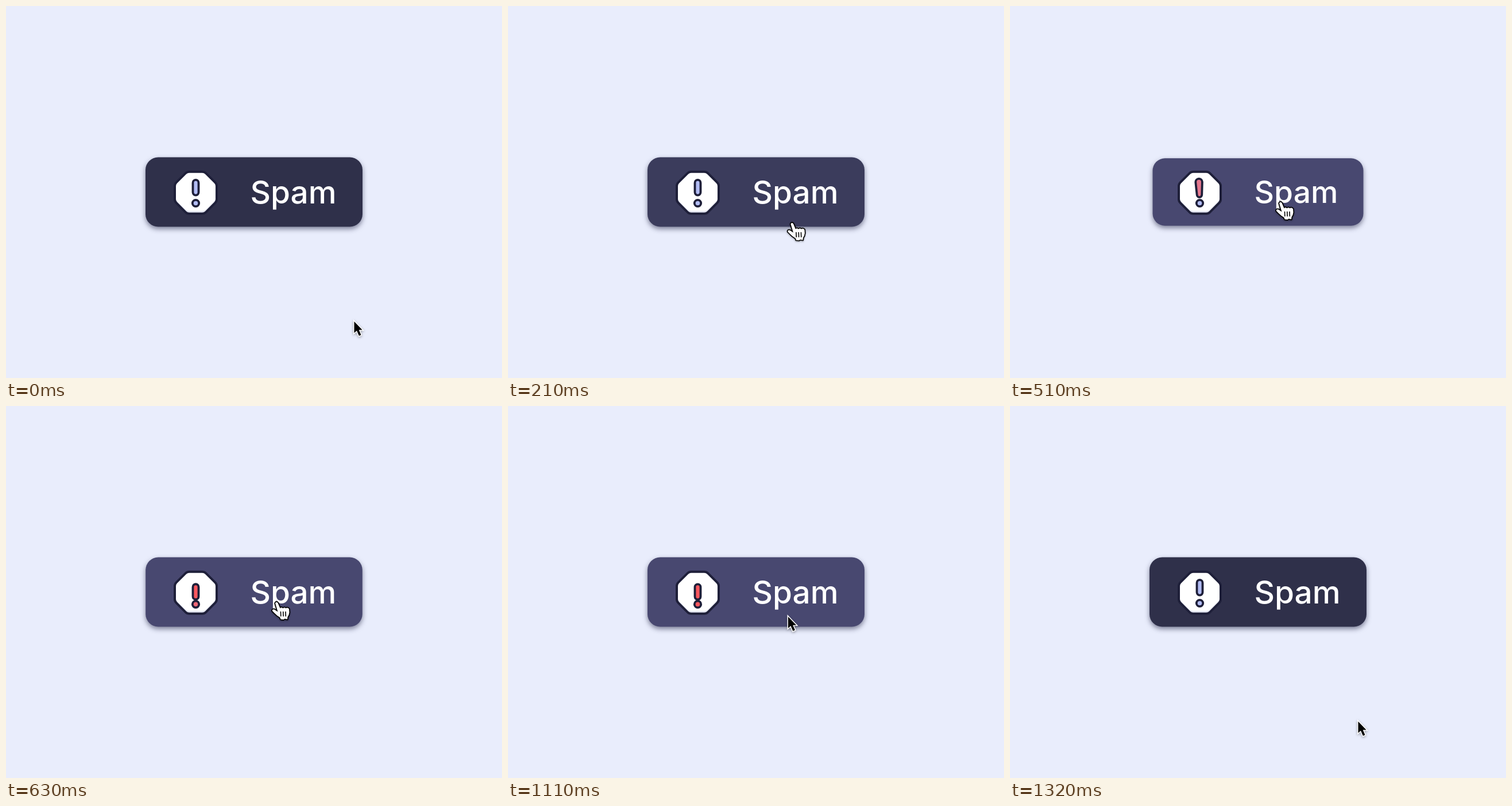
An HTML page with a canvas that plays this animation: 864x648 px, repeating every 1800 ms.

```html
<!DOCTYPE html>
<html lang="en">
<head>
<meta charset="utf-8">
<title>Spam button</title>
<style>
  html, body { margin: 0; width: 100%; height: 100%; overflow: hidden; background: #e9edfc; }
  canvas { display: block; }
</style>
</head>
<body>
<canvas id="stage" width="864" height="648"></canvas>
<script>
const ctx = document.getElementById('stage').getContext('2d');
const LOOP = 1800, STEP = 30;
const DARK = [47, 48, 74], HOVER = [72, 72, 112];
const BLUE = [178, 188, 244], RED = [251, 87, 94];
const INK = '#1e1f39';
const ICON = { x: 330.5, y: 325.2 };
const HAND = new Path2D('M-2.5 2Q-.5 -1.8 2 1.5L6 11Q8 8 11 11Q13.5 8.5 16 11Q19 8.8 21.5 12L22 18Q21.5 23 19 26L18.5 30L14 29L12 30.5L7 30L6 27Q0 23.5 -3 20L-7.5 15.5Q-8 12 -4 13L2 17Z');
const ARROW = new Path2D('M0 0V20L4.5 16L8.4 25L12 23.4L8.2 14.8H14.2Z');

const lerp = (a, b, k) => a + (b - a) * k;
const mix = (a, b, k) => `rgb(${a.map((v, i) => Math.round(lerp(v, b[i], k))).join()})`;
const clamp = v => Math.min(1, Math.max(0, v));

// The standard CSS "ease" curve, solved by bisection.
function ease(x) {
  const bez = (p, q, s) => 3 * p * s * (1 - s) ** 2 + 3 * q * s * s * (1 - s) + s ** 3;
  if (x <= 0 || x >= 1) return clamp(x);
  let lo = 0, hi = 1;
  for (let i = 0; i < 24; i++) {
    const mid = (lo + hi) / 2;
    if (bez(0.25, 0.25, mid) < x) lo = mid; else hi = mid;
  }
  return bez(0.1, 1, lo);
}
const ramp = (t, from, to) => ease((t - from) / (to - from));
const pulse = (t, a, b, c, d) => ramp(t, a, b) - ramp(t, c, d);

function withShadow(color, blur, dy, draw) {
  ctx.save();
  ctx.shadowColor = color;
  ctx.shadowBlur = blur;
  ctx.shadowOffsetY = dy;
  draw();
  ctx.restore();
}

function drawButton(t) {
  const scale = 1 - 0.029 * pulse(t, 420, 510, 540, 660);
  ctx.save();
  ctx.translate(432, 324);
  ctx.scale(scale, scale);
  ctx.fillStyle = mix(DARK, HOVER, pulse(t, 180, 285, 1110, 1250));
  withShadow('rgba(47,48,80,.58)', 8, 4, () => {
    ctx.beginPath();
    ctx.roundRect(-189, -60.5, 378, 121, 22);
    ctx.fill();
  });
  ctx.fillStyle = '#fff';
  ctx.font = '500 55px Inter, sans-serif';
  ctx.fillText('Spam', -6.6, 19.6);
  ctx.restore();
}

function octagon(half, radius) {
  const path = new Path2D();
  const corner = i => {
    const a = (i + 0.5) * Math.PI / 4, r = half / Math.cos(Math.PI / 8);
    return [r * Math.cos(a), r * Math.sin(a)];
  };
  path.moveTo(half, 0);
  for (let i = 0; i < 8; i++) path.arcTo(...corner(i), ...corner(i + 1), radius);
  path.closePath();
  return path;
}
const SIGN = octagon(36.5, 9);

function drawSign() {
  ctx.save();
  ctx.translate(ICON.x, ICON.y);
  ctx.fillStyle = '#dfe2ee';
  ctx.fill(SIGN);
  ctx.save();
  ctx.clip(SIGN);
  ctx.translate(0, -5);
  ctx.fillStyle = '#fff';
  withShadow('#fff', 3, 0, () => ctx.fill(SIGN));
  ctx.restore();
  ctx.strokeStyle = INK;
  ctx.lineWidth = 4;
  ctx.stroke(SIGN);
  ctx.restore();
}

function outlined(fill) {
  ctx.fillStyle = fill;
  ctx.fill();
  ctx.strokeStyle = INK;
  ctx.lineWidth = 3.8;
  ctx.stroke();
}

function drawMark(t) {
  const stretch = pulse(t, 440, 510, 540, 640);
  const drop = pulse(t, 540, 650, 1110, 1260);
  const barRed = pulse(t, 450, 600, 1110, 1260);
  const dotRed = pulse(t, 570, 680, 1110, 1260);
  const swing = clamp((t - 660) / 420);
  const tilt = 8 * (1 - swing) * Math.sin(3 * Math.PI * swing) - 2.2 * stretch;

  ctx.save();
  ctx.translate(ICON.x, 343.5 + 1.9 * drop);
  ctx.beginPath();
  ctx.arc(0, 0, 5.7, 0, 2 * Math.PI);
  outlined(mix(BLUE, RED, dotRed));

  ctx.rotate(tilt * Math.PI / 180);
  ctx.translate(0, 5.6 * drop);
  ctx.beginPath();
  ctx.arc(0, -35.6 - 1.3 * stretch, 5 + 0.8 * stretch, Math.PI, 2 * Math.PI);
  ctx.arc(0, -18.9 + 4.2 * stretch, 5 - 0.7 * stretch, 0, Math.PI);
  ctx.closePath();
  outlined(mix(BLUE, RED, barRed));
  ctx.restore();
}

function drawHand() {
  ctx.lineJoin = ctx.lineCap = 'round';
  ctx.strokeStyle = '#000';
  ctx.lineWidth = 3.4;
  withShadow('rgba(0,0,0,.3)', 3, 1.5, () => ctx.stroke(HAND));
  ctx.fillStyle = '#fff';
  ctx.fill(HAND);
  ctx.lineWidth = 1.6;
  ctx.beginPath();
  for (const x of [7, 11.3, 15.5]) {
    ctx.moveTo(x, 17);
    ctx.lineTo(x + 0.3, 24.5);
  }
  ctx.stroke();
}

function drawArrow() {
  ctx.strokeStyle = '#fff';
  ctx.lineWidth = 3;
  withShadow('rgba(0,0,0,.35)', 4, 1.5, () => ctx.stroke(ARROW));
  ctx.fillStyle = '#000';
  ctx.fill(ARROW);
}

function drawCursor(t) {
  const k = pulse(t, 0, 400, 1082, 1322);
  ctx.save();
  ctx.translate(lerp(606.5, 471.5, k), lerp(549.5, 341.5, k));
  if (t >= 180 && t < 1080) drawHand(); else drawArrow();
  ctx.restore();
}

function render(t) {
  ctx.fillStyle = '#e9edfc';
  ctx.fillRect(0, 0, 864, 648);
  drawButton(t);
  drawSign();
  drawMark(t);
  drawCursor(t);
}

const start = performance.now();
function tick() {
  const t = (performance.now() - start) % LOOP;
  render(Math.floor(t / STEP) * STEP);
  requestAnimationFrame(tick);
}
tick();
</script>
</body>
</html>
```
